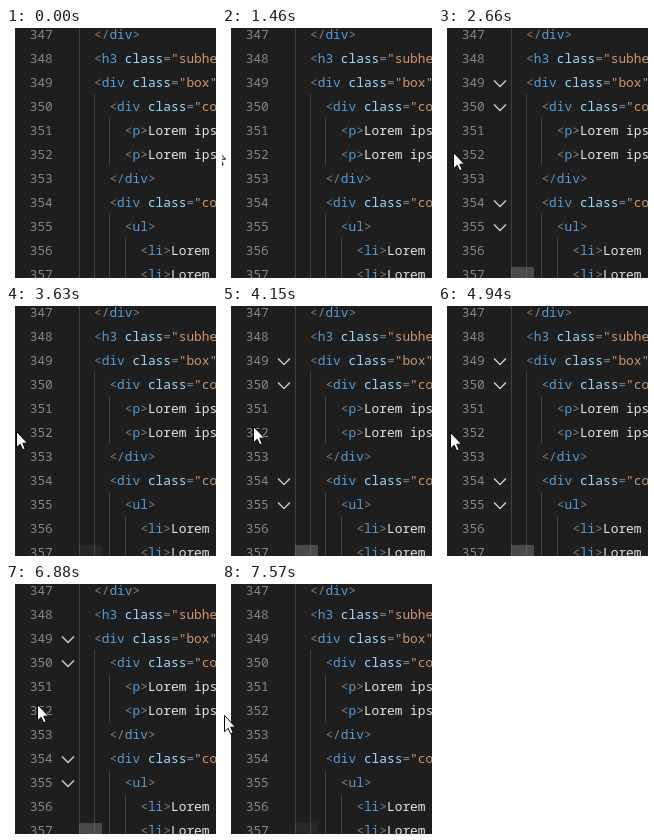
These frames come from a looping animation (210 by 250 pixels, 7670 ms). An HTML page:

```html
<!DOCTYPE html>
<html lang="en">
<head>
<meta charset="utf-8">
<title>Code folding</title>
<style>
  html, body { margin: 0; width: 100%; height: 100%; overflow: hidden; background: #fff; }
  svg { display: block; width: 210px; height: 250px; }
  text { font: 500 12.83px "Noto Sans Mono", "DejaVu Sans Mono", monospace; white-space: pre; }
  .num { fill: #858585; font-weight: 400; }
  .mark { fill: #808080; }
  .tag { fill: #569cd6; }
  .attr { fill: #9cdcfe; }
  .str { fill: #d0956c; }
  .txt { fill: #e4e4e4; }
  .guide { fill: #404040; }
  #folds { fill: none; stroke: #c8c8d2; stroke-width: 1.5; }
</style>
</head>
<body>
<svg viewBox="0 0 210 250">
  <rect x="9" width="201" height="250" fill="#1e1e1e"/>
  <g id="guides"></g>
  <g id="code"></g>
  <g id="folds"></g>
  <rect id="slider" x="73" y="239" width="23" height="11" fill="#797979" fill-opacity=".48"/>
  <path id="cursor" d="M.5 .5V16.8L4.2 13.3L6.7 18.8L9.2 17.7L6.8 12.2H11.6Z" fill="#fff" stroke="#000"/>
</svg>
<script>
const LOOP = 7670, CHAR = 7.7, ROW = 24, LEFT = 88, FIRST = 347;
const $ = id => document.getElementById(id);

function add(parent, name, attrs, text) {
  const el = document.createElementNS("http://www.w3.org/2000/svg", name);
  for (const key in attrs) el.setAttribute(key, attrs[key]);
  if (text) el.textContent = text;
  return parent.appendChild(el);
}

const source = `
</div>
<h3 class="subhe
<div class="box"
  <div class="co
    <p>Lorem ips
    <p>Lorem ips
  </div>
  <div class="co
    <ul>
      <li>Lorem
      <li>Lorem`.slice(1).split("\n");

function kind(token, prev) {
  if (/^[<>=]/.test(token)) return "mark";
  if (token[0] === '"') return "str";
  if (token === "class") return "attr";
  return /^<\/?$/.test(prev) ? "tag" : "txt";
}

const indent = line => line.search(/\S/);

source.forEach((line, row) => {
  const y = 11 + ROW * row, depth = indent(line);
  add($("code"), "text", { x: 23.7, y, class: "num" }, String(FIRST + row));
  const text = add($("code"), "text", { x: LEFT + depth * CHAR, y });
  let prev = "";
  for (const token of line.trim().match(/<\/?|>|"\w*"?|=|\s+|\w+/g)) {
    add(text, "tspan", { class: kind(token, prev) }, token);
    prev = token;
  }
  for (let col = 0; col <= depth; col += 2)
    add($("guides"), "rect", {
      x: Math.floor(73 + col * CHAR), y: ROW * row - 6, width: 1, height: ROW, class: "guide"
    });
  // A line folds when the next one is deeper.
  if (row + 1 < source.length && indent(source[row + 1]) > depth)
    add($("folds"), "path", { d: `M56 ${ROW * row + 4.5}l6 6l6 -6` });
});

// The pointer glides from the left edge to the gutter and back, three times.
const GLIDE = 600, HOME = [31, 120];
const visits = [
  { enter: 1425, leave: 2480, from: [-13, 119], to: [0, 128] },
  { enter: 3520, leave: 4730, from: [0, 128], to: [-1, 131] },
  { enter: 5860, leave: 6880, from: [-1, 131], to: [2, 131] }
];

const ramp = (t, start, length) => Math.min(1, Math.max(0, (t - start) / length));
const easeOut = u => 1 - (1 - u) ** 2;

function draw(t) {
  const { enter, leave, from, to } = visits.findLast(v => t >= v.enter) || visits[0];
  const away = t < leave ? from : to;
  const reach = easeOut(ramp(t, enter, GLIDE)) - easeOut(ramp(t, leave, GLIDE));
  let [x, y] = away.map((a, i) => a + (HOME[i] - a) * reach);

  // A brief peek over the edge before the first visit.
  const peek = ramp(t, 770, 130);
  x += 3 * Math.sin(Math.PI * peek);
  y += 24 * (1 - peek);

  const shown = (delayIn, fadeIn, delayOut, fadeOut) =>
    ramp(t, enter + delayIn, fadeIn) - ramp(t, leave + delayOut, fadeOut);
  $("cursor").setAttribute("transform", `translate(${Math.round(x)} ${Math.round(y)})`);
  $("folds").setAttribute("opacity", shown(160, 500, 220, 450));
  $("slider").setAttribute("opacity", shown(90, 100, 250, 550));
}

const start = performance.now();
function tick() {
  draw((performance.now() - start) % LOOP);
  requestAnimationFrame(tick);
}
tick();
</script>
</body>
</html>
```
